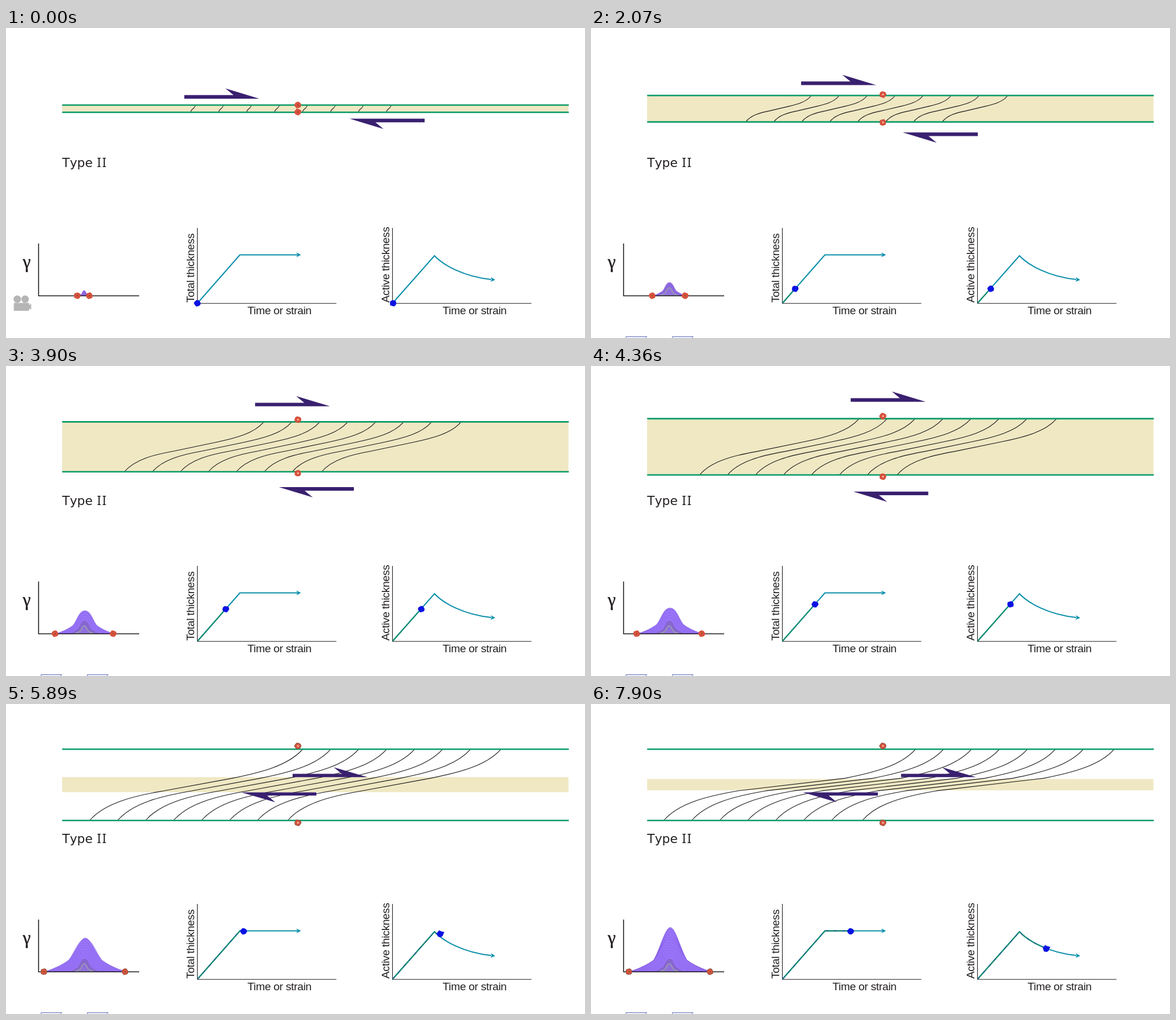
Animation, 1000 px wide and 535 px high, one loop 8 s. Source, as an HTML page:

```html
<!DOCTYPE html>
<html lang="en">
<head>
<meta charset="utf-8">
<title>Shear zone, type II</title>
<style>
html, body { margin: 0; width: 100%; height: 100%; overflow: hidden; background: #fff; }
svg { display: block; width: 100%; height: 100%; }
.label { font: 19px "Liberation Sans", Arial, sans-serif; letter-spacing: -.35px; }
.title { font: 21.500px "DejaVu Sans", Verdana, sans-serif; font-kerning: none; }
</style>
</head>
<body>
<svg viewBox="0 0 1000 535" fill="none">
  <defs>
    <clipPath id="clipTotal"><rect id="doneTotal" x="325" y="340" height="140"/></clipPath>
    <clipPath id="clipActive"><rect id="doneActive" x="662" y="340" height="140"/></clipPath>
    <path id="total" d="M331 474.500L404 391.500H503"/>
    <path id="active" d="M668 474.500L740 393C755 409 790 429 838 434"/>
  </defs>

  <rect id="band" x="97" width="874.500" fill="#efe8c3"/>
  <path id="markers" stroke="#1c1a1c" stroke-width="1.100"/>
  <path id="walls" stroke="#0a9a68" stroke-width="2.600" stroke-linecap="round"/>
  <path id="arrowA" fill="#39206f"/>
  <path id="arrowB" fill="#39206f"/>

  <g fill="#231f20">
    <text class="title" x="97" y="240">Type <tspan x="157 166" font-size="22" font-family="Noto Sans, sans-serif">II</tspan></text>
    <text x="29" y="414" font-size="31" font-family="Liberation Serif, Times, serif" stroke="#231f20" stroke-width=".5">γ</text>
    <g class="label">
      <text x="417" y="494">Time or strain</text>
      <text x="754" y="494">Time or strain</text>
      <text transform="translate(325 474) rotate(-90)">Total thickness</text>
      <text transform="translate(661.500 474) rotate(-90)">Active thickness</text>
    </g>
  </g>

  <g id="bells"></g>
  <path d="M56.300 372V462.300H230" stroke="#231f20" stroke-width="1.600"/>
  <path d="M330.500 345V475.300H570.500M667.500 345V475.300H907.500" stroke="#231f20" stroke-width="1.100"/>

  <g stroke="#0a8fab" stroke-width="2">
    <use href="#total"/><use href="#active"/>
  </g>
  <g fill="#0a8fab">
    <path d="M509.500 391.500L501.500 387.500L503.500 391.500L501.500 395.500Z"/>
    <path d="M0 0L-8 -4L-6 0L-8 4Z" transform="translate(845 434.800) rotate(6)"/>
  </g>
  <g stroke="#0f8c6c" stroke-width="1.900">
    <use href="#total" clip-path="url(#clipTotal)"/>
    <use href="#active" clip-path="url(#clipActive)"/>
  </g>
  <g id="wear" stroke="#3a40a8" stroke-width="1.300" stroke-dasharray="5 9" opacity=".7">
    <use href="#total" clip-path="url(#clipTotal)"/>
    <use href="#active" clip-path="url(#clipActive)"/>
  </g>

  <g id="dots"></g>
  <g id="camera" fill="#b5b5b5">
    <circle cx="19.500" cy="468" r="6.500"/><circle cx="33" cy="468" r="6.500"/>
    <path d="M13.500 474.500H40V478L43.500 476V486L40 484V488H13.500Z"/>
  </g>
  <g id="buttons" fill="#eef0fb" stroke="#6b78bd">
    <path id="button" d="M60.500 537V532.500H96.500L92 537"/>
    <use href="#button" x="80"/>
  </g>
</svg>
<script>
const LOOP = 8000, LOCK = 30;
const el = id => document.getElementById(id);
const set = (node, attrs) => { for (const k in attrs) node.setAttribute(k, attrs[k]); };
const add = (parent, name, attrs = {}) => {
  const node = document.createElementNS("http://www.w3.org/2000/svg", name);
  set(node, attrs);
  return el(parent).appendChild(node);
};

// piecewise linear through [input, output] pairs
function lerp(pairs, v) {
  let i = 1;
  while (i < pairs.length - 1 && v >= pairs[i][0]) i++;
  const [a, p] = pairs[i - 1], [b, q] = pairs[i];
  return p + (q - p) * (v - a) / (b - a);
}

// time in ms -> step number
const CLOCK = [[0, 0], [750, 1], [1740, 7], [1870, 8], [2070, 9], [2200, 10], [2880, 14],
  [3010, 15], [3240, 16], [3370, 17], [4030, 21], [4230, 22], [4360, 23], [4560, 24],
  [5220, 28], [5350, 29], [5890, 32], [6070, 33], [6370, 35], [6510, 36], [7040, 39],
  [7240, 40], [7370, 41], [7570, 42], [7900, 44], [8000, 44.900]];

function blob(x, y, r, seed) {
  let d = "";
  for (let i = 0; i < 10; i++) {
    const a = i * Math.PI / 5, q = r * (1 + .08 * Math.sin(i * 2.700 + seed * 1.700));
    d += (i ? "L" : "M") + (x + q * Math.cos(a)).toFixed(2) + " " + (y + q * .95 * Math.sin(a)).toFixed(2);
  }
  return d + "Z";
}

function arrow(x, y, bar, h) {
  return `M${x} ${y}v${-bar}h85l-14 ${bar - h}l58.500 ${h}Z`;
}

// two curved limbs joined by a straight sheared middle
function marker(xb, yb, xt, yt) {
  const u = Math.min(xt - xb, 356) / 356, v = (yb - yt) / 123;
  return `M${xb} ${yb}c${26 * u} ${-30 * v} ${75 * u} ${-42 * v} ${127 * u} ${-51 * v}` +
    `L${xt - 121 * u} ${yt + 50 * v}c${50 * u} ${-10 * v} ${96 * u} ${-22 * v} ${121 * u} ${-50 * v}`;
}

function bell(s) {
  const m = Math.min(s, LOCK), w = 10.500 + 1.985 * m, c = 135 + .065 * m;
  const h = 9 + 1.530 * s, low = .36 * (9 + 1.530 * m);
  const tip = s > LOCK ? .13 : .2, mid = low + (h - low) * (s > LOCK ? .34 : .42);
  const p = (x, y) => `${(c + x * w).toFixed(2)} ${(462 - y).toFixed(2)} `;
  return "M" + p(-1, 0) + "C" + p(-.78, low * .22) + p(-.55, low * .62) + p(-.41, low) +
    "C" + p(-.25, mid) + p(-tip, h) + p(0, h) +
    "C" + p(tip, h) + p(.25, mid) + p(.41, low) +
    "C" + p(.55, low * .62) + p(.78, low * .22) + p(1, 0) + "Z";
}

const hump = add("bells", "path", { stroke: "#8c68e4", "stroke-width": .8 });
const rings = [];
const ring = (k, attrs) => rings.push({ k, node: add("bells", "path", { d: bell(k), ...attrs }) });
for (let k = 42; k > 9; k -= 3) ring(k, { stroke: "#8459dd", "stroke-width": .8, opacity: .7 });
ring(9, { fill: "#8767cf" });
ring(3, { fill: "#8f6fdc", stroke: "#9a9bb2", "stroke-width": 1.800 });

const reds = [0, 1, 2, 3].map(() => ({
  body: add("dots", "path", { fill: "#d9543e", "stroke-width": 1.200 }),
  core: add("dots", "circle", { r: 1.200 })
}));
const blues = [0, 1].map(() => add("dots", "path", { fill: "#0b12e2" }));

function draw(s) {
  const m = Math.min(s, LOCK), late = s - m, free = s <= LOCK;
  const top = 133 - 1.833 * m, bottom = 145.500 + 1.850 * m;

  const half = 13 - .27 * (s - 32);
  set(el("band"), free ? { y: top, height: bottom - top } : { y: 139.200 - half, height: 2 * half });
  set(el("walls"), { d: `M98 ${top}H971M98 ${bottom}H971` });

  const xb = 319 - 5.700 * m - 1.570 * late, xt = 327 + 5.900 * m + 4 * late;
  let d = "";
  for (let i = 0; i < 8; i++) {
    const dx = 48.300 * i + (i === 7 ? Math.min(5, .13 * s) : 0);
    d += marker(xb + dx, bottom - .5, xt + dx, top + .5);
  }
  set(el("markers"), { d });

  const a = free ? arrow(308 + 6.110 * s, 122 - 2.620 * s, 6.200, 17.700)
    : arrow(495 + 3.375 * (s - 32), 126.200, 5.700, 17);
  set(el("arrowA"), { d: a });
  set(el("arrowB"), { d: a, transform: "rotate(180 515.500 139.300)" });

  set(hump, { d: bell(s), fill: s <= 9 ? "#8b67df" : "#9975fa" });
  for (const { k, node } of rings) node.style.display = k < s ? "" : "none";

  const spots = [[504, 133 - 2.020 * m], [504, 145 + 2 * m],
    [123 - 1.920 * m, 462], [144 + 2.050 * m, 462]];
  reds.forEach(({ body, core }, i) => {
    const [x, y] = spots[i];
    set(body, { d: blob(x, y, 5.300, m + i), stroke: free ? "#cf4a36" : "#94513d" });
    set(core, { cx: x + .3, cy: y, fill: s === 0 ? "#8a3a2a" : i < 2 ? "#fff2e6" : "#8f4a34" });
  });

  const tx = free ? 330.500 + 2.450 * s : 404 + 3.170 * late;
  const px = free ? 668.500 + 2.440 * s : 750 + 3.020 * (s - 32);
  const py = free ? 475 - 2.770 * s : lerp([[30, 392], [32, 396.500], [39, 414], [44, 422]], s);
  set(blues[0], { d: blob(tx, free ? py : 392.300, 5.800, m) });
  set(blues[1], {
    d: free ? blob(px, py, 5.800, m + 2)
      : `M${px - 6} ${py - 1}l4 -5l4 2l5 1l-3 7l-3 2l-5 -1Z`
  });
  set(el("doneTotal"), { width: Math.max(0, tx - 325) });
  set(el("doneActive"), { width: Math.max(0, px - 662) });

  el("wear").style.display = free ? "none" : "";
  el("camera").style.display = s ? "none" : "";
  el("buttons").style.display = s ? "" : "none";
}

const start = performance.now();
let shown = -1;
function tick() {
  const t = (performance.now() - start) % LOOP;
  const s = Math.floor(lerp(CLOCK, t) + 1e-6);
  if (s !== shown) draw(shown = s);
  requestAnimationFrame(tick);
}
tick();
</script>
</body>
</html>
```
